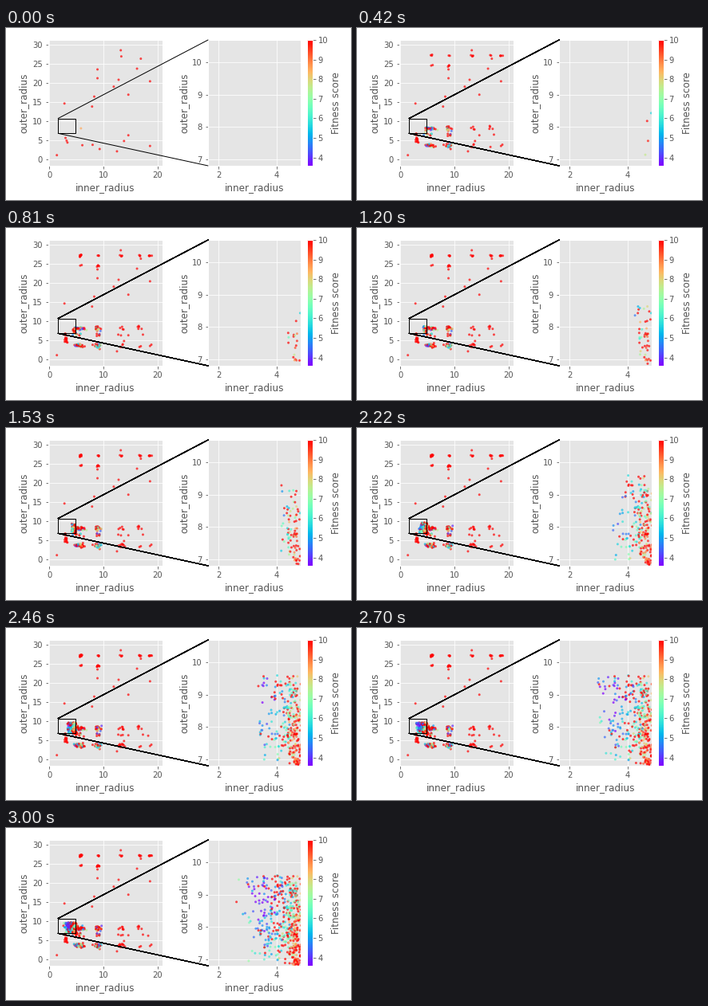
Animation, 432 px wide and 216 px high, one loop 3030 ms. Source, as a matplotlib script:

```python
import math
import random

import matplotlib.pyplot as plt
from matplotlib.animation import FuncAnimation
from matplotlib.cm import ScalarMappable
from matplotlib.colors import Normalize
from matplotlib.patches import ConnectionPatch, Rectangle

W, H, FRAMES, STEP = 432, 216, 101, 30
LOW, HIGH = 3.58, 10
ZOOM_X, ZOOM_Y = (1.63, 4.82), (6.8, 10.7)
rng = random.Random(12)

# First generation: scattered, all poor except the last.
PARENTS = [
    (1.4, 1.1), (2.8, 14.6), (3.0, 5.6), (3.2, 4.9), (3.35, 4.4),
    (6.1, 3.7), (8.0, 3.8), (9.3, 2.7), (7.9, 13.8), (8.3, 16.4),
    (8.9, 21.2), (8.9, 23.5), (11.9, 19.0), (12.8, 20.8), (13.2, 28.5),
    (13.3, 26.9), (12.5, 2.1), (13.8, 4.8), (14.6, 6.3), (14.6, 16.9),
    (16.2, 23.7), (16.9, 26.3), (18.6, 20.4), (18.6, 3.5), (5.85, 8.1),
]
COLUMNS = [5.1, 5.9, 9.0, 13.3, 16.8, 18.6]
ROWS = [27.1, 24.4, 8.1, 6.3, 3.6]


def cross(count):
    """Children where inherited columns and rows meet, mostly early."""
    for _ in range(count):
        y = rng.choices(ROWS, [3, 1, 10, 3, 9])[0]
        if y > 10:
            x = rng.choice(COLUMNS[1:] if y > 25 else COLUMNS[1:3])
            spread = .12
        else:
            bell = [math.exp(-((c - 7) / 4.5) ** 2) + .14 for c in COLUMNS]
            x = rng.choices(COLUMNS, bell)[0]
            spread = .3
        good = y < 10 and x < 10 and rng.random() < .5
        score = rng.uniform(LOW, 9) if good else HIGH
        born = 1 + int(99 * rng.random() ** 2.8)
        yield born, rng.gauss(x, spread), rng.gauss(y, spread), score


def mutate(count):
    """Poor variants of the parents near inner_radius 3."""
    for _ in range(count):
        yield (rng.randint(1, 25), rng.gauss(3, .15),
               rng.uniform(4.3, 6.8), HIGH)


def evolve(count):
    """Growing swarm whose front moves left towards the optimum."""
    xs, ys = [], []
    for k in range(1, count + 1):
        t = (k / count) ** (1 / 2.6)
        front = 4.45 - 2 * t ** 2.2
        if xs and rng.random() < .45:
            x = rng.choice(xs) + rng.gauss(0, .03)
        else:
            x = front + (5 - front) * rng.random() ** 1.1
        if ys and rng.random() < .3:
            y = rng.choice(ys) + rng.gauss(0, .03)
        else:
            top = min(9.6, 7.2 + 4.7 * t)
            depth = min(1, 2 * t) * (1 + 2 * max(0, x - 2.4) / 2.4)
            y = top - depth * rng.random()
        xs.append(x)
        ys.append(y)
        score = 3.4 + 2.5 * (x - 3.5) ** 2 + 1.3 * abs(y - 9)
        score += rng.gauss(0, .8)
        if rng.random() < (.45 if x > 3.8 else .1):
            score = HIGH
        yield math.ceil(100 * t), x, y, min(max(score, LOW), HIGH)


points = [(0, x, y, HIGH) for x, y in PARENTS[:-1]]
points.append((0, *PARENTS[-1], 8.5))
points += [*cross(270), *mutate(16), *evolve(540)]
points.sort(key=lambda p: p[0])
born = [p[0] for p in points]
places = [p[1:3] for p in points]
scores = [p[3] for p in points]

plt.style.use("ggplot")
plt.rcParams["font.family"] = "DejaVu Sans"
fig = plt.figure(figsize=(W / 72, H / 72), dpi=72, facecolor="white")
norm = Normalize(LOW, HIGH)


def panel(left, right, top=15, bottom=173):
    return fig.add_axes([left / W, 1 - bottom / H,
                         (right - left) / W, (bottom - top) / H])


def cloud(ax, xlim, ylim, xticks, yticks):
    ax.set(xlim=xlim, ylim=ylim, xticks=xticks, yticks=yticks,
           xlabel="inner_radius", ylabel="outer_radius")
    return ax.scatter([], [], c=[], s=9, linewidths=0, alpha=.7,
                      cmap="rainbow", norm=norm)


main, zoom, bar = panel(52.5, 195.6), panel(253, 369), panel(376.6, 383.6)
clouds = [
    cloud(main, (-.25, 20.85), (-1.67, 31.2), [0, 10, 20], range(0, 31, 5)),
    cloud(zoom, ZOOM_X, ZOOM_Y, [2, 4], range(7, 11)),
]
cbar = fig.colorbar(ScalarMappable(norm, "rainbow"), cax=bar,
                    ticks=range(4, 11))
cbar.set_label("Fitness score")
bar.grid(False)


def zoom_mark():
    """Box on the main panel and its two guides to the zoom panel."""
    box = Rectangle((ZOOM_X[0], ZOOM_Y[0]), ZOOM_X[1] - ZOOM_X[0],
                    ZOOM_Y[1] - ZOOM_Y[0], fill=False, ec="black",
                    lw=1, zorder=5)
    parts = [main.add_patch(box)]
    for corner in (0, 1):
        guide = ConnectionPatch((ZOOM_X[0], ZOOM_Y[corner]), (0, corner),
                                "data", "axes fraction", axesA=main,
                                axesB=zoom, color="black", lw=1)
        parts.append(fig.add_artist(guide))
    return parts


# The mark is laid down again each generation, so its edges harden.
marks = [zoom_mark() for _ in range(16)]


def update(i):
    n = sum(b <= i for b in born)
    for c in clouds:
        c.set_offsets(places[:n])
        c.set_array(scores[:n])
    for k, parts in enumerate(marks):
        for part in parts:
            part.set_visible(k <= i)
    return clouds


anim = FuncAnimation(fig, update, frames=FRAMES, interval=STEP,
                     repeat=True, repeat_delay=0, blit=False)
plt.show()
```
